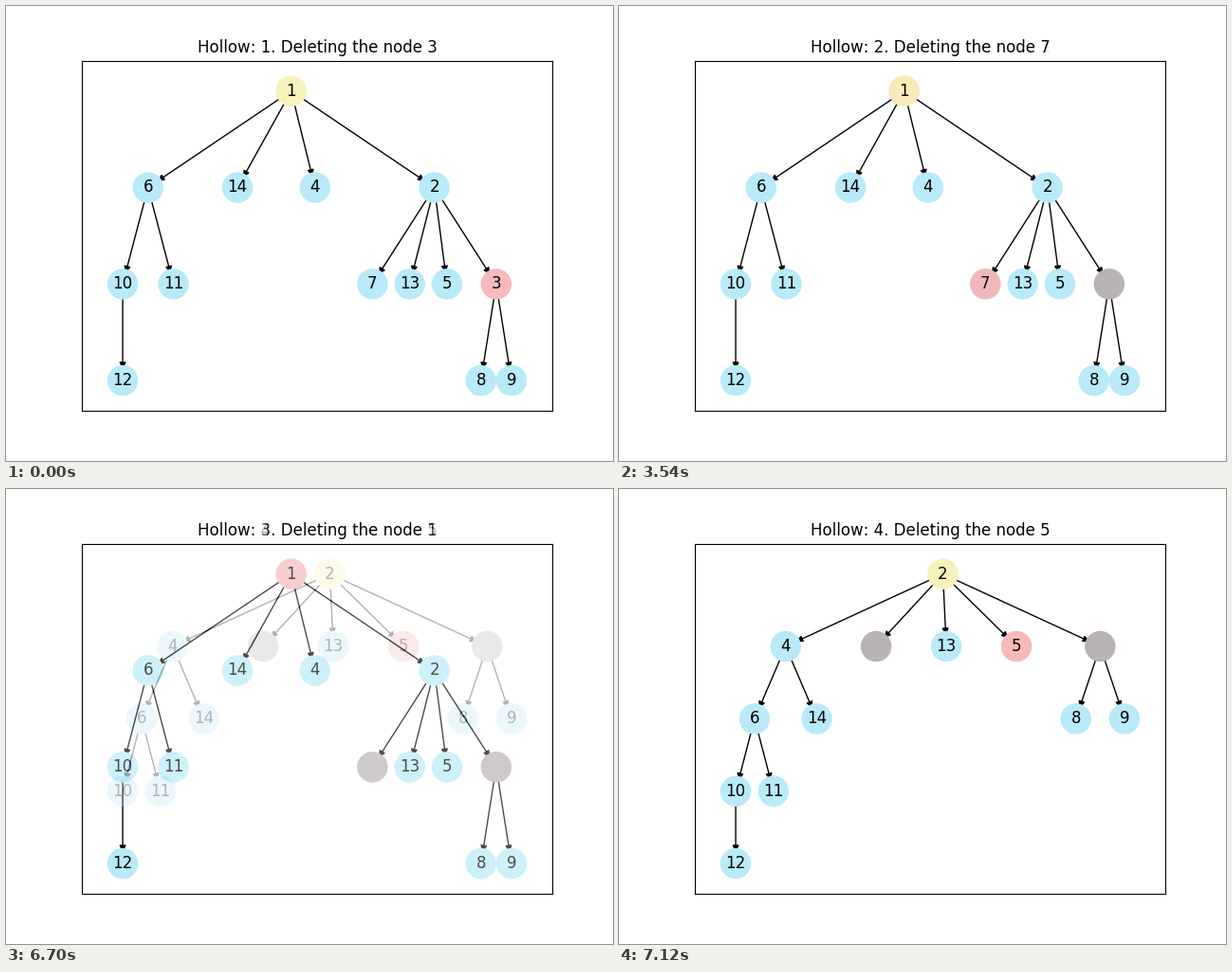
A matplotlib script that plays this animation: 640x480 px, repeating every 8 s.

```python
import matplotlib.pyplot as plt
import numpy as np
from matplotlib.animation import FuncAnimation
from matplotlib.patches import FancyArrowPatch

WIDTH, HEIGHT, DPI = 640, 480, 100
LOOP_MS, TICK_MS = 8000, 20
FIRST_FADE_MS, FADE_PERIOD_MS = 500, 3040
FADE_STEP_MS, FADE_STEPS = 60, 10

BLUE, YELLOW, PINK, GRAY = "#b9eaf9", "#f7f2b9", "#f7b9b9", "#bab3b5"
NODE_SIZE, ARROW_GAP = 500, 300 ** 0.5 / 2
PADDING = 1.1 ** 2

# Root first; each node maps to its children from left to right.
FIRST_HEAP = {1: [6, 14, 4, 2], 6: [10, 11], 10: [12],
              2: [7, 13, 5, 3], 3: [8, 9]}
REBUILT_HEAP = {2: [4, 7, 13, 5, 3], 4: [6, 14], 6: [10, 11], 10: [12],
                3: [8, 9]}
HEAPS = [FIRST_HEAP, FIRST_HEAP, FIRST_HEAP, REBUILT_HEAP]
DELETIONS = [3, 7, 1, 5]

plt.rcParams.update({"font.family": "DejaVu Sans", "text.kerning_factor": 6})
fig = plt.figure(figsize=(WIDTH / DPI, HEIGHT / DPI), dpi=DPI)


def tree_layout(children):
    """Average an even split from the root with an even spread of leaves."""
    root = next(iter(children))
    nodes = {root}.union(*children.values())
    leaf_total = len(nodes) - len(children)
    pos, leaves = {}, []

    def place(node, left, width, level):
        kids = children.get(node, [])
        if kids:
            share = width / len(kids)
            spread = [place(kid, left + i * share, share, level + 1)
                      for i, kid in enumerate(kids)]
            leaf_x = (spread[0] + spread[-1]) / 2
        else:
            leaf_x = len(leaves) / leaf_total
            leaves.append(node)
        pos[node] = ((leaf_x + left + width / 2) / 2, -level)
        return leaf_x

    place(root, 0, 1, 0)
    return root, pos


def padded_limits(values):
    center = (min(values) + max(values)) / 2
    half = (max(values) - min(values)) / 2 * PADDING
    return center - half, center + half


def render_stage(index):
    """Draw one stage of the heap and return it as an RGB array."""
    children, deleted = HEAPS[index], DELETIONS[index]
    hollow = DELETIONS[:index]
    root, pos = tree_layout(children)
    xs, ys = zip(*pos.values())

    fig.clear()
    ax = fig.add_subplot()
    ax.set(xlim=padded_limits(xs), ylim=padded_limits(ys), xticks=[], yticks=[])
    ax.set_title(f"Hollow: {index + 1}. Deleting the node {deleted}")

    def color(node):
        if node in hollow:
            return GRAY
        if node == deleted:
            return PINK
        return YELLOW if node == root else BLUE

    ax.scatter(xs, ys, s=NODE_SIZE, c=[color(node) for node in pos], zorder=2)
    for parent, kids in children.items():
        for kid in kids:
            ax.add_patch(FancyArrowPatch(
                pos[parent], pos[kid], arrowstyle="-|>", mutation_scale=10,
                shrinkA=ARROW_GAP, shrinkB=ARROW_GAP, color="black",
                linewidth=1, zorder=1))
    for node in pos:
        if node not in hollow:
            ax.text(*pos[node], str(node), fontsize=12,
                    ha="center", va="center", zorder=3)

    fig.canvas.draw()
    return np.asarray(fig.canvas.buffer_rgba())[..., :3] / 255


stills = [render_stage(index) for index in range(len(HEAPS))]
fig.clear()
picture = fig.figimage(stills[0])


def update(frame):
    elapsed = frame * TICK_MS - FIRST_FADE_MS
    if elapsed < 0:
        picture.set_data(stills[0])
    else:
        stage, since = divmod(elapsed, FADE_PERIOD_MS)
        mix = min(since // FADE_STEP_MS + 1, FADE_STEPS) / FADE_STEPS
        picture.set_data(stills[stage] * (1 - mix) + stills[stage + 1] * mix)
    return [picture]


anim = FuncAnimation(fig, update, frames=LOOP_MS // TICK_MS,
                     interval=TICK_MS, repeat=True, repeat_delay=0)
plt.show()
```
